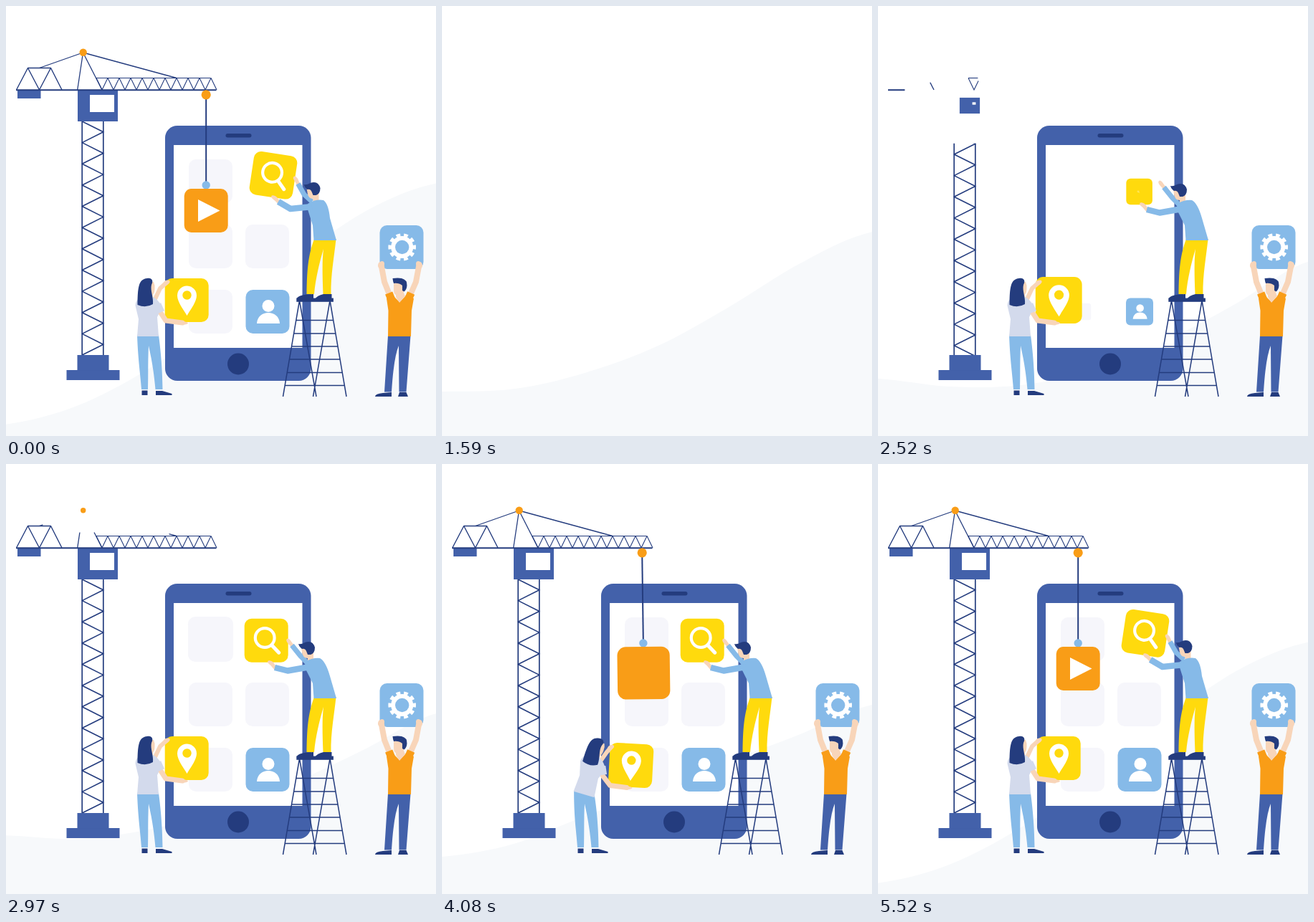
An HTML page that plays this animation: 600 px wide and 600 px high, repeating every 5550 ms.

```html
<!DOCTYPE html>
<html lang="en">
<head>
<meta charset="utf-8">
<title>App construction</title>
<style>
html, body { margin: 0; width: 100%; height: 100%; overflow: hidden; background: #fff; }
svg { display: block; width: 100vw; height: 100vh; }
</style>
</head>
<body>
<svg id="stage" viewBox="0 0 600 600"></svg>
<script>
const LOOP = 5550, CUT = 1530;
const BLUE = '#4361aa', NAVY = '#243c7e', ORANGE = '#f99d17', SKY = '#86bae8',
  YELLOW = '#ffda0d', SKIN = '#f8d5b9', LILAC = '#d3daec', TILE = '#f6f6fb', MIST = '#f7f9fb';
const stage = document.getElementById('stage');
let now = 0; // ms, counted on past LOOP until the scene is cleared

// Timing
const clamp = v => Math.max(0, Math.min(1, v));
const ramp = (start, dur) => clamp((now - start) / dur);
const smooth = (start, end) => { const p = ramp(start, end - start); return p * p * (3 - 2 * p); };
const bump = (a, b, c, d) => smooth(a, b) - smooth(c, d);
function pop(start, dur = 350, s = 1.7) {
  const q = ramp(start, dur) - 1;
  return q <= -1 ? 0 : 1 + (s + 1) * q ** 3 + s * q * q;
}
const mix = (a, b, k) => a.map((v, i) => v + (b[i] - v) * k);

// Shapes
const rect = (x, y, w, h, fill, r = 0) =>
  w > 0 && h > 0 ? `<rect x="${x}" y="${y}" width="${w}" height="${h}" rx="${r}" fill="${fill}"/>` : '';
const circle = (x, y, r, fill) => r > 0 ? `<circle cx="${x}" cy="${y}" r="${r}" fill="${fill}"/>` : '';
const ellipse = (x, y, rx, ry, fill, turn = 0) =>
  `<ellipse cx="${x}" cy="${y}" rx="${rx}" ry="${ry}" fill="${fill}" transform="rotate(${turn} ${x} ${y})"/>`;
const path = (d, fill) => `<path d="${d}" fill="${fill}"/>`;
const line = (d, w, color = NAVY, cap = 'butt') =>
  `<path d="${d}" fill="none" stroke="${color}" stroke-width="${w}" stroke-linecap="${cap}" stroke-linejoin="round"/>`;
const trim = (d, w, p) => p <= 0 ? '' : p >= 1 ? line(d, w) :
  `<path d="${d}" fill="none" stroke="${NAVY}" stroke-width="${w}" pathLength="1" stroke-dasharray="${p} 2"/>`;
const group = (transform, body) => `<g transform="${transform}">${body}</g>`;
const grow = (s, x, y, body) =>
  s <= 0 ? '' : group(`translate(${x} ${y}) scale(${s}) translate(${-x} ${-y})`, body);
const tile = (x, y, fill) => rect(x - 30.5, y - 30.5, 61, 61, fill, 10);
const limb = (points, color, w, cap = 'round') => line('M' + points.join('L'), w, color, cap);

// Time, then heights of the hill at x = 0, 100 ... 600
const hills = [
  [2040, 553, 571, 568, 543, 495, 433, 376],
  [2520, 520, 531, 529, 508, 468, 415, 357],
  [3540, 516, 513, 486, 455, 417, 377, 337],
  [4080, 548, 530, 491, 455, 415, 377, 336],
  [5535, 585, 559, 507, 437, 358, 288, 248],
  [6450, 515, 478, 425, 370, 305, 245, 222],
  [7590, 553, 571, 568, 543, 495, 433, 376]
];
function hill() {
  const t = now < 2040 ? now + LOOP : now;
  const i = hills.findIndex((h, n) => n && t <= h[0]);
  const [a, b] = [hills[i - 1], hills[i]];
  const y = mix(a, b, (t - a[0]) / (b[0] - a[0])).slice(1);
  const slope = n => (y[Math.min(n + 1, 6)] - y[Math.max(n - 1, 0)]) / 6;
  let d = `M0 ${y[0]}`;
  for (let n = 0; n < 6; n++)
    d += `C${n * 100 + 33} ${y[n] + slope(n)} ${n * 100 + 67} ${y[n + 1] - slope(n + 1)} ${n * 100 + 100} ${y[n + 1]}`;
  return path(d + 'V600H0Z', MIST);
}

function phone() {
  const body = 356 * smooth(1700, 1950), screen = 283 * smooth(1935, 2175);
  return rect(222, 523 - body, 203.5, body, BLUE, Math.min(17, body / 2)) +
    rect(234, 477 - screen, 179.5, screen, '#fff') +
    grow(pop(2130), 324, 181, rect(306.5, 178, 36, 5.5, NAVY, 2.7)) +
    circle(324, 499.5, 15 * pop(2150), NAVY) +
    [[285.5, 426.5, 2488], [364.5, 335.5, 2560], [285.5, 335.5, 2620], [285.5, 244.5, 2680]]
      .map(([x, y, start]) => grow(pop(start), x, y, tile(x, y, TILE))).join('') +
    grow(pop(2462), 365, 426.5, tile(365, 426.5, SKY) + circle(366, 418.5, 8.5, '#fff') +
      path('M350 443C351 423 381 423 382 443Z', '#fff'));
}

function zigzag(count, x, y, dx, dy, along) {
  let d = `M${x} ${y}`;
  for (let n = 1; n <= count; n++)
    d += along ? `L${x + n * dx} ${n % 2 ? y + dy : y}` : `L${n % 2 ? x + dx : x} ${y + n * dy}`;
  return d;
}

function crane() {
  const left = 326 * (1 - smooth(2150, 2650) ** .55), top = 161 + left;
  const mast = left >= 326 ? '' : `<clipPath id="mast"><path d="M100 ${top}H142V487H100Z"/></clipPath>
    <g clip-path="url(#mast)">${line('M106.2 161V487M135.8 161V487', 1.7)}
    ${group(`translate(0 ${left * .53})`, line(zigzag(22, 106.2, 161, 29.6, 14.82), 1.6))}
    </g>`;
  const jib = ramp(2490, 370);
  return mast +
    grow(pop(1705, 330), 121.5, 522, rect(84.5, 508, 74, 14, BLUE)) +
    grow(pop(1795), 121.5, 508, rect(99.5, 487, 44, 21.5, BLUE)) +
    grow(pop(2476), 128, 139, rect(100, 117, 56, 44, BLUE)) +
    grow(pop(2510), 134, 136, rect(117, 124, 34, 24, '#fff')) +
    grow(pop(2600), 32, 117, rect(16, 117, 32.5, 12, BLUE)) +
    trim('M78 117L62.5 86.5L46.5 117L30.5 86.5L14.5 117', 1.4, jib) +
    trim('M62.5 86.5H30.5', 1.4, ramp(2700, 150)) +
    trim(zigzag(21, 126, 100.5, 8, 16.5, true), 1.1, jib) +
    trim('M126 100.5H285.5', 1.1, jib) +
    trim('M14 117.2H293.5', 2, jib) +
    trim('M99.7 117L107.5 65', 1.3, ramp(2880, 220)) +
    trim('M134 117L107.5 65', 1.3, ramp(2880, 220)) +
    trim('M46.5 86.5L107.5 65', 1.3, ramp(2950, 260)) +
    trim('M238 100.5L107.5 65', 1.3, ramp(2950, 260)) +
    circle(107.7, 64.7, 5.2 * pop(2900), ORANGE);
}

function hook() {
  const p = ramp(3960, 1170);
  const swing = -1.4 * Math.sin(p * Math.PI * 2) * (1 - p);
  const drop = 123 * smooth(3250, 3520);
  return group(`rotate(${swing} 279 124)`,
    (drop ? line(`M279.2 124v${drop}`, 2) : '') +
    circle(279.2, 250, 5.7 * pop(3550), SKY) +
    grow(pop(3840, 460, 2.6), 279.2, 255, tile(279.2, 285.5, ORANGE)) +
    grow(pop(4090), 280, 285.5, path('M268 270L298.5 285.5L268 301Z', '#fff'))) +
    circle(279.2, 123.8, 6.6 * pop(3100), ORANGE);
}

function woman() {
  const lean = 1 - smooth(2100, 2450) + bump(3490, 4050, 4150, 4520) + bump(5570, 6080, 6180, 6440);
  const angle = 16 * lean, rad = angle * Math.PI / 180;
  const turn = (x, y) => [198 + (x - 198) * Math.cos(rad) - (y - 461) * Math.sin(rad),
    461 + (x - 198) * Math.sin(rad) + (y - 461) * Math.cos(rad)];
  const held = (x, y) => [x + 11.5 * lean, y + 9.5 * lean];
  const upper = held(224, 386), lower = held(246, 442);
  const pin = group(`translate(${11.5 * lean} ${10 * lean}) rotate(${3 * lean} 252 410.5)`,
    grow(pop(2258), 252, 410.5, tile(252.2, 410.5, YELLOW) +
      path('M252.5 432C248 424 239 413 239 404A13.5 13.5 0 0 1 266 404C266 413 257 424 252.5 432Z', '#fff') +
      circle(252.5, 403.5, 6.2, YELLOW)));
  const figure =
    path('M189.5 536.5H197.5V543H189.5ZM209 537H218L231.5 541V543H209Z', NAVY) +
    limb([turn(207, 411), mix(turn(215, 394), held(215, 394), .5), upper], SKIN, 6) +
    ellipse(...upper, 5, 3, SKIN, -28) +
    path(`M${turn(183, 459)}L${turn(213, 459)}C217 490 218 510 218.5 535H208.5C206 508 203 492 199 474
      C198 495 198.500 515 198 535H189C187 510 184 490 ${turn(183, 459)}Z`, SKY) +
    group(`rotate(${angle} 198 461)`,
      path('M197 396H205V409L200 413L194 409Z', SKIN) +
      path('M183 461L185 437L180.5 418C181 409 187 407 192 406L205 406Q212 409 218 420L211 434L213 461Z', LILAC) +
      path('M200 385H206Q208 389 207.500 395Q207 403 203 404H198Z', SKIN) +
      path('M183.500 417C184 395 184 381 197 380C204 379 206 384 203 389C201 397 206 406 205 416Q195 422 183.500 417Z', NAVY)) +
    limb([mix(turn(214, 425), turn(219, 433), .5), held(223, 439), lower], SKIN, 7) +
    ellipse(...held(247, 442.5), 7, 2.2, SKIN) +
    limb([turn(212, 416), turn(217, 427)], LILAC, 9, 'butt');
  return pin + grow(pop(2015), 203, 543, figure);
}

function ladder() {
  const rungs = [438.5, 457, 475, 493, 511.5, 529.5].map(y => {
    const spread = (y - 413) * .172;
    return `M${409 - spread} ${y}H${452 + spread}`;
  }).join('');
  return grow(pop(1760), 430.5, 545,
    line('M409.500 411L386.500 545M409.500 411L433 545M452 411L428.500 545M452 411L475 545' + rungs, 1.5) +
    rect(405.3, 407.6, 51.6, 5.2, NAVY));
}

function climber() {
  const k = bump(3080, 3480, 3570, 3970) + bump(5110, 5530, 5580, 6000);
  const at = (x, y, x2, y2) => mix([x, y], [x2, y2], k);
  const [ix, iy] = at(363.2, 246.2, 373, 236.3);
  const icon = group(`translate(${ix} ${iy}) rotate(${8.5 * k})`,
    grow(pop(2465), 3.5, 32, rect(-30.5, -30.5, 61, 61, YELLOW, 10)) +
    grow(pop(2515), 0, 14,
      '<circle cx="-2" cy="-3.7" r="13.4" fill="none" stroke="#fff" stroke-width="4.2"/>' +
      line('M8 7L17.500 17', 5, '#fff', 'round')));
  const high = at(395, 248, 404.5, 242), low = at(370, 278, 375, 268);
  const cuff = at(375, 284, 380, 273), wrist = at(399, 253, 407.5, 248);
  const [hx, hy] = at(0, 0, 7.5, -2);
  const figure =
    path('M419 402.500L429 402V408.500H405.500Q407 404 419 402.500ZM443 402H454.500V409H431Q434 404 443 402Z', NAVY) +
    path('M430 325H460.500C458 350 453 375 453.500 402H442.500C441.500 375 441 355 443 339C437 360 432 380 430 402H419.500C420 370 421 350 430 325Z', YELLOW) +
    limb([wrist, high], SKIN, 5) + ellipse(...high, 2.6, 5, SKIN, -35) +
    limb([at(421, 278, 427, 273), at(411, 268, 416, 263), wrist], SKY, 7, 'butt') +
    group(`translate(${hx} ${hy})`,
      path('M412 256L424 254L429 262V276L421 274V271Q414 271 413 262Z', SKIN) +
      path('M408 251Q412 252 417 249Q428 245 431 256Q431 264 425 266L421 266L419 261Q417 257 413 258Q409 255 408 251Z', NAVY)) +
    path(`M429.500 327L428 306L${at(418, 286, 421, 284)}L${at(417, 276, 421, 276)}Q${at(428, 270, 432, 269)}
      ${at(438, 271, 443, 271)}Q${at(446, 275, 450, 276)} 452 296L461 327Z`, SKY) +
    limb([cuff, low], SKIN, 5) + ellipse(...low, 5.5, 2.8, SKIN, 32) +
    limb([at(424, 283, 427, 280), at(393, 288.5, 397, 283), cuff], SKY, 8.5, 'butt');
  return icon + grow(pop(2024), 433, 409, figure);
}

function lifter() {
  const k = bump(3140, 3480, 3560, 3900) + bump(5950, 6270, 6300, 6620);
  const at = (x, y, x2, y2) => mix([x, y], [x2, y2], k);
  const size = pop(1780), extra = Math.max(0, size - 1);
  const icon = group(`translate(${552 + 3.5 * k - 75 * extra} ${336.5 + 6 * k - 134 * extra})`,
    grow(pop(1945), 0, 0, tile(0, 0, SKY)) +
    grow(pop(2030), 0, 0, circle(.7, 0, 15.5, '#fff') +
      '<circle cx=".7" r="16.5" fill="none" stroke="#fff" stroke-width="5.6" pathLength="100" stroke-dasharray="5.4 4.6" stroke-dashoffset="2.7"/>' +
      circle(.7, 0, 9.7, SKY)));
  const arm = (shoulder, elbow, hand, tilt) =>
    limb([shoulder, elbow, hand], SKIN, 8) + ellipse(...hand, 4, 5.5, SKIN, tilt) +
    limb([shoulder, mix(shoulder, elbow, .38)], ORANGE, 11, 'butt');
  const figure =
    path('M538 539V545H515Q515 541 526 540ZM549 539H558.500L561 545H547Z', NAVY) +
    path('M533 460H564.500L558.500 538.500H548.500L548 474Q541 490 538 538.500H528Z', BLUE) +
    arm(at(538, 410, 538, 411), at(528, 385, 518, 391), at(523.5, 361, 529, 367), 35) +
    arm(at(561, 410, 563, 411), at(572, 385, 584, 391), at(576.5, 361, 580.5, 367), -35) +
    path('M533 461L533.500 425L531 408L540 404L549 413L558 404L569 408L566 425L565 461Z', ORANGE) +
    group(`translate(${-1.5 * k} ${k})`,
      path('M541 387L555 386V400L557 405L549 414L544 406V403Q541 402 541 396Z', SKIN) +
      path('M539.500 380Q547 379 552 380Q560 382 559.500 390Q559 396 555.500 398.500L553 397V390Q548 386 541 387Q540 385 539.500 380Z', NAVY));
  return icon + grow(size, 540, 545, figure);
}

function render(ms) {
  const t = ms % LOOP;
  now = t < CUT ? t + LOOP : t;
  stage.innerHTML = hill() + phone() + crane() + hook() + woman() + ladder() + climber() + lifter();
}

const begin = performance.now();
function tick() {
  render(performance.now() - begin);
  requestAnimationFrame(tick);
}
tick();
</script>
</body>
</html>
```
